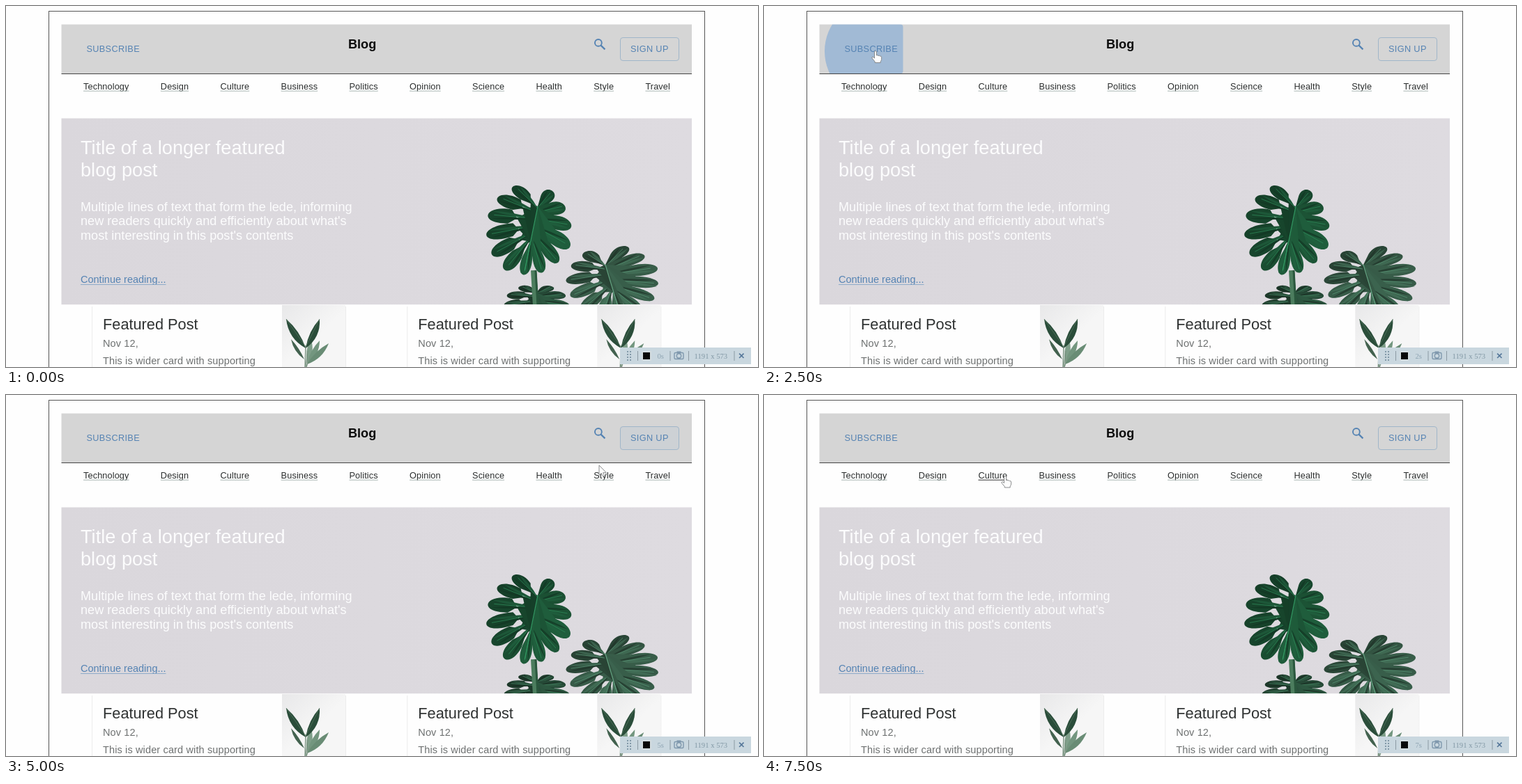
Recreate the animation shown at these times as an HTML page with a canvas. Size 1079 px wide and 519 px high, loop 8000 ms.

```html
<!DOCTYPE html>
<html lang="en">
<head>
<meta charset="utf-8">
<title>Blog</title>
<style>
  html, body { margin: 0; width: 100%; height: 100%; overflow: hidden; background: #fefefe; }
  canvas { display: block; width: 1079px; height: 519px; }
</style>
</head>
<body>
<canvas id="stage"></canvas>
<script>
const W = 1079, H = 519, LOOP = 8000, STEP = 250, TAU = Math.PI * 2;
const SANS = '"Liberation Sans", Arial, sans-serif';
const SERIF = '"Liberation Serif", "Times New Roman", serif';
const BLUE = '#5583b3', HERO = '#dcd9de';
const SUBSCRIBE = [79.5, 26.5, 120, 70.5], SIGNUP = [881.5, 45.5, 84, 33];
const LABELS = 'Technology Design Culture Business Politics Opinion Science Health Style Travel'.split(' ');

// Pointer stops: time, x, y
const STOPS = [[1750, 172, 104], [2250, 160, 65], [2750, 160, 64], [3500, 887, 50],
  [4000, 893, 51], [4500, 908, 62], [5000, 851, 101], [5750, 577, 118], [7500, 346, 116]];
const CLICKS = [[2250, SUBSCRIBE], [4250, SIGNUP]];

const canvas = document.getElementById('stage');
const dpr = window.devicePixelRatio || 1;
canvas.width = W * dpr;
canvas.height = H * dpr;
const view = canvas.getContext('2d');
let c = view;

const lerp = (a, b, u) => a + (b - a) * u;
const lerpPoint = (p, q, u) => [lerp(p[0], q[0], u), lerp(p[1], q[1], u)];

function random(seed) {
  return () => (seed = (seed * 16807) % 2147483647) / 2147483647;
}

function rect(x, y, w, h, color) {
  c.fillStyle = color;
  c.fillRect(x, y, w, h);
}

function text(str, x, y, size, color, spacing = 0, font = SANS, weight = '') {
  c.font = `${weight} ${size}px ${font}`;
  c.letterSpacing = spacing + 'px';
  c.fillStyle = color;
  c.fillText(str, x, y);
  return c.measureText(str).width;
}

function line(x1, y1, x2, y2, color, width = 1) {
  c.strokeStyle = color;
  c.lineWidth = width;
  c.beginPath();
  c.moveTo(x1, y1);
  c.lineTo(x2, y2);
  c.stroke();
}

function fade(x1, y1, x2, y2, from, to) {
  const g = c.createLinearGradient(x1, y1, x2, y2);
  g.addColorStop(0, from);
  g.addColorStop(1, to);
  return g;
}

// Pointed shape between two points
function blade([x1, y1], [x2, y2], w, color, bend = 0) {
  const len = Math.hypot(x2 - x1, y2 - y1);
  const nx = (y1 - y2) / len, ny = (x2 - x1) / len;
  const mx = (x1 + x2) / 2, my = (y1 + y2) / 2;
  c.beginPath();
  c.moveTo(x1, y1);
  c.quadraticCurveTo(mx + nx * (bend + w), my + ny * (bend + w), x2, y2);
  c.quadraticCurveTo(mx + nx * (bend - w), my + ny * (bend - w), x1, y1);
  c.fillStyle = color;
  c.fill();
}

// Split leaf: fingers run from a midrib out to an ellipse with a notch at one angle
function splitLeaf({ center: [cx, cy], rx, ry, joint, notch, fingers, sat, dark, light, seed }) {
  const rnd = random(seed), gap = .22;
  const edge = a => [cx + rx * Math.cos(a), cy + ry * Math.sin(a)];
  const tip = edge(notch + Math.PI);
  const root = a => lerpPoint(joint, tip, .45 * (1 - Math.cos(a - notch)) / 2);
  const at = (a, r) => lerpPoint(root(a), edge(a), r);
  const green = l => `hsl(148 ${sat}% ${l}%)`;
  const span = (TAU - 2 * gap) / fingers;

  for (let i = 0; i < fingers; i++) {
    const a = notch + gap + i * span, b = a + span, mid = (a + b) / 2;
    const tone = lerp(dark, light, .35 + .25 * Math.cos(mid - .6) + .4 * rnd());
    const cut = .42 + .14 * rnd(), reach = 1.12 + .08 * rnd();
    c.beginPath();
    c.moveTo(...joint);
    c.lineTo(...at(a, cut));
    c.bezierCurveTo(...at(a + span * .04, reach), ...at(b - span * .04, reach), ...at(b, cut));
    c.lineTo(...tip.map((v, k) => lerp(joint[k], v, .5)));
    c.closePath();
    c.fillStyle = green(tone);
    c.fill();
    blade(root(mid), at(mid + span * .2, .92), 4, green(lerp(tone, light, .6)));
    blade(root(mid), at(mid - span * .2, .9), 3, green(lerp(tone, dark, .7)));
    line(...root(mid), ...at(mid, .85), green(light + 12), .7);
  }
  line(...joint, ...lerpPoint(joint, tip, .9), green(light + 14), 1.2);
}

function monstera() {
  c.save();
  c.beginPath();
  c.rect(680, 240, 280, 189);
  c.clip();
  splitLeaf({ center: [761, 432], rx: 50, ry: 34, joint: [761, 412], notch: -1.57,
    fingers: 11, sat: 32, dark: 14, light: 30, seed: 11 });
  line(757, 380, 760, 431, '#4c7d5e', 8);
  line(760, 380, 763, 431, '#2a573d', 3);
  splitLeaf({ center: [871, 397], rx: 70, ry: 54, joint: [860, 372], notch: -1.75,
    fingers: 13, sat: 25, dark: 16, light: 37, seed: 29 });
  splitLeaf({ center: [750, 322.5], rx: 64, ry: 68, joint: [763, 288], notch: -1.45,
    fingers: 13, sat: 50, dark: 14, light: 26, seed: 5 });
  c.restore();
}

function card(dx) {
  c.save();
  c.translate(dx, 0);
  for (const x of [123.5, 487.5]) line(x, 432, x, H, '#ececec');
  text('Featured Post', 139, 465.2, 21.75, '#2f3232');
  text('Nov 12,', 139, 490, 14.5, '#6e7171', .136);
  text('This is wider card with supporting', 139, 515, 14.5, '#6e7171', .136);

  // potted plant
  rect(396, 430, 91, 89, fade(396, 430, 440, 480, '#e8e8e9', '#f6f6f6'));
  for (let i = 0; i < 3; i++) {
    line(430 + i * 3, 488 + i * 8, 429 + i, H, '#7b9482', 1.4);
    blade([432, 515], [437 + i * 13, 477 + i * 4], 8, `hsl(140 14% ${56 - i * 4}%)`, 2);
  }
  blade([428, 508], [409, 479], 5, '#43624f', -2);
  for (const side of [-1, 1]) {
    const tip = [426 + side * 24, 450];
    blade([430, 492], tip, 10, '#2a4d3a', side * 3);
    line(430, 490, ...tip, '#567761', .7);
  }
  c.restore();
}

function page() {
  rect(0, 0, W, H, '#fefefe');
  c.strokeStyle = '#555';
  c.lineWidth = 1;
  c.strokeRect(61.5, 7.5, 941, 600);
  rect(79.5, 26.5, 904.5, 70.5, '#d5d5d5');
  rect(79.5, 97, 904.5, 1, '#444');
  text('Blog', 491, 61, 18.12, '#0c0c0c', 0, SANS, 'bold');

  // search icon
  c.strokeStyle = BLUE;
  c.lineWidth = 1.9;
  c.beginPath();
  c.arc(849.9, 52.9, 4.9, 0, TAU);
  c.stroke();
  line(853.6, 56.6, 859.4, 62.4, BLUE, 2.2);

  rect(79.5, 161.5, 904.5, 267.7, fade(80, 0, 984, 0, '#dad7dc', '#dedbe0'));
  monstera();
  const white = '#fcfcfd';
  ['Title of a longer featured', 'blog post']
    .forEach((s, i) => text(s, 107, 213 + i * 31.6, 27.18, white));
  ['Multiple lines of text that form the lede, informing',
    'new readers quickly and efficiently about what\'s',
    'most interesting in this post\'s contents']
    .forEach((s, i) => text(s, 107, 294.6 + i * 20.5, 18.12, white));
  const w = text('Continue reading...', 107, 398.4, 14.5, BLUE);
  line(107, 400.5, 107 + w, 400.5, '#8eabc9');
  card(0);
  card(452.3);
}

// The still page is painted once and reused
const still = document.createElement('canvas');
still.width = canvas.width;
still.height = canvas.height;
c = still.getContext('2d');
c.scale(dpr, dpr);
page();
c.font = `12.69px ${SANS}`;
c.letterSpacing = '0.136px';
let navX = 111;
const links = LABELS.map(label => {
  const w = c.measureText(label).width, box = [navX, 103, w, 24];
  navX += w + 45.3;
  return { label, box };
});
c = view;

const inside = (p, [x, y, w, h]) => !!p && p[0] >= x && p[0] <= x + w && p[1] >= y && p[1] <= y + h;

function pointer(t) {
  if (t < STOPS[0][0]) return null;
  const i = STOPS.findIndex(s => s[0] > t);
  if (i < 0) return STOPS.at(-1).slice(1);
  const [from, to] = [STOPS[i - 1], STOPS[i]];
  return lerpPoint(from.slice(1), to.slice(1), (t - from[0]) / (to[0] - from[0]));
}

function ripple(t, pressed, box) {
  const k = (t - pressed) / STEP;
  if (k <= 0 || k > 3) return;
  c.save();
  c.beginPath();
  c.roundRect(...box, 3.6);
  c.clip();
  c.beginPath();
  c.arc(...pointer(pressed), 73 * k, 0, TAU);
  c.fillStyle = `rgba(89,149,211,${.42 * .4 ** (k - 1)})`;
  c.fill();
  c.restore();
}

function buttons(t, p) {
  for (const [pressed, box] of CLICKS) ripple(t, pressed, box);
  text('SUBSCRIBE', 115.4, 66, 12.69, BLUE, .363);
  text('SIGN UP', 896, 66.3, 12.69, BLUE, .363);
  c.strokeStyle = inside(p, SIGNUP) ? '#8aaaca' : '#a0b6c9';
  c.lineWidth = 1;
  c.beginPath();
  c.roundRect(...SIGNUP, 3.6);
  c.stroke();
}

function nav(p) {
  for (const { label, box } of links) {
    text(label, box[0], 120.2, 12.69, '#2a2d2d', .136);
    line(box[0], 122.2, box[0] + box[2], 122.2, inside(p, box) ? '#333' : '#a9b6b3');
  }
}

const ARROW = new Path2D('M0 0V14.5L3.3 11.5L5.5 16L7.8 15L5.7 10.7H10.4Z');
const HAND = new Path2D('M-1.5 1Q0-.8 1.5 1V6.5Q3 5.6 4 7Q5.5 6.2 6.3 7.6Q8.4 7 8.6 9V12Q8.4 14 7.2 15.2V17H-.8V15.5L-5 10.5Q-5.6 8.4-3.5 8.8L-1.5 10.5Z');

function cursor(p) {
  const hot = [SUBSCRIBE, SIGNUP, ...links.map(l => l.box)].some(box => inside(p, box));
  const shape = hot ? HAND : ARROW;
  c.save();
  c.translate(...p);
  c.fillStyle = '#fdfdfd';
  c.fill(shape);
  c.strokeStyle = '#7e8082';
  c.lineWidth = .9;
  c.lineJoin = 'round';
  c.stroke(shape);
  c.restore();
}

function recorder(t) {
  rect(881, 491, 188, 24, '#c9d7df');
  for (let i = 0; i < 8; i++) rect(891 + i % 2 * 4, 496 + (i >> 1) * 4, 2, 2, '#8299a8');
  for (const x of [906.5, 953, 979.5, 1045]) line(x, 496, x, 510, '#8b9aa3');
  rect(912, 496, 14, 14, '#d3dce0');
  rect(914, 498, 10, 10, '#080808');
  text(Math.floor(t / 1000) + 's', 934.5, 506.5, 10.7, '#8fa5b3', 0, SERIF);
  text('1191 x 573', 987.5, 506.5, 10.7, '#8298a5', 0, SERIF);

  // camera
  c.strokeStyle = '#7f98ad';
  c.lineWidth = 1.4;
  c.beginPath();
  c.roundRect(959, 498.5, 13, 9, 1.5);
  c.moveTo(968.7, 503);
  c.arc(965.5, 503, 3.2, 0, TAU);
  c.stroke();
  rect(962.5, 496.5, 6, 2, '#7f98ad');

  for (const s of [-1, 1]) line(1055.3 - 3.2, 502.8 - 3.2 * s, 1055.3 + 3.2, 502.8 + 3.2 * s, '#56789a', 1.7);
}

function draw(t) {
  const p = pointer(t);
  c.setTransform(1, 0, 0, 1, 0, 0);
  c.drawImage(still, 0, 0);
  c.scale(dpr, dpr);
  buttons(t, p);
  nav(p);
  recorder(t);
  if (p) cursor(p);
}

const start = performance.now();
function tick() {
  const t = (performance.now() - start) % LOOP;
  draw(Math.floor(t / STEP) * STEP);
  requestAnimationFrame(tick);
}
tick();
</script>
</body>
</html>
```
